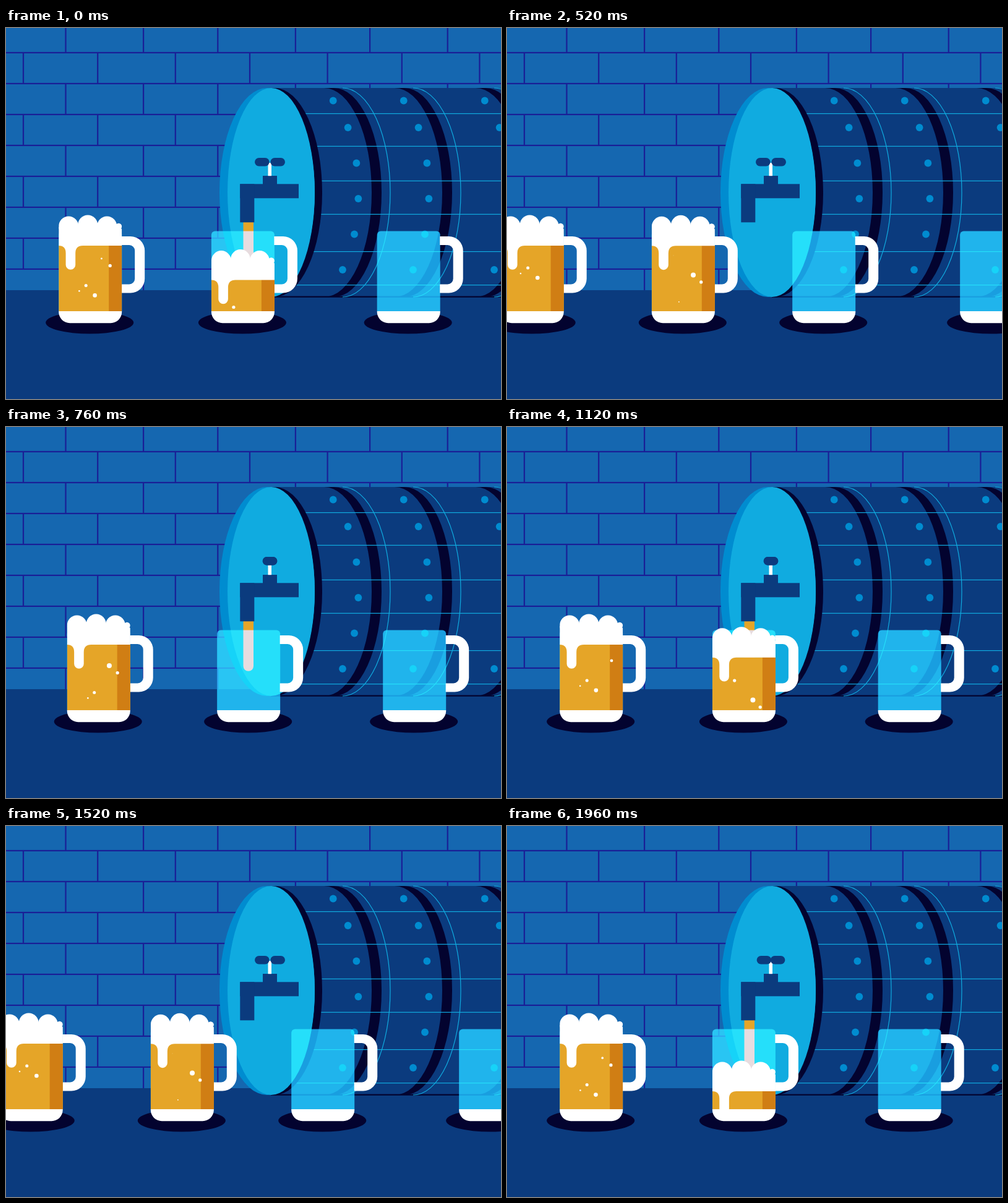
Write an HTML page with a canvas that moves like this. It is 800 px wide and 600 px high and loops after 2 s.

```html
<!DOCTYPE html>
<html lang="en">
<head>
<meta charset="utf-8">
<title>Beer line</title>
<style>
html, body { margin: 0; width: 100%; height: 100%; overflow: hidden; background: #0b3b7e; }
canvas { display: block; width: 800px; height: 600px; }
</style>
</head>
<body>
<canvas id="stage" width="800" height="600"></canvas>
<script>
const ctx = document.getElementById('stage').getContext('2d');
const NAVY = '#0b3b7e', DARK = '#03032f', CYAN = '#10abe0', BLUE = '#008cd0',
      WALL = '#1567b0', GROUT = '#1a1e96', BEER = '#e5a528', AMBER = '#d07e14', WHITE = '#fff';
const CYCLE = 1000;
const STOPS = [874, 599.7, 331.9, 85.2, -155];
const BARREL = { y: 266, rx: 77, ry: 169 };
// x, time of birth, radius
const BUBBLES = [[36, -899, 2.6], [65, -321, 4], [76.5, -110, 2.6], [44, 477, 2.5], [56, 770, 3.3], [35, 640, 1.3]];

const clamp = (v, lo, hi) => Math.max(lo, Math.min(hi, v));

function rect(x, y, w, h, color) {
  ctx.fillStyle = color;
  ctx.fillRect(x, y, w, h);
}

function round(x, y, w, h, r, color) {
  ctx.fillStyle = color;
  ctx.beginPath();
  ctx.roundRect(x, y, w, h, r);
  ctx.fill();
}

function oval(x, y, rx, ry, color) {
  ctx.fillStyle = color;
  ctx.beginPath();
  ctx.ellipse(x, y, rx, ry, 0, 0, 7);
  ctx.fill();
}

// Symmetric cubic-bezier(2/3, 0, 1/3, 1)
function ease(x) {
  x = clamp(x, 0, 1);
  let lo = 0, hi = 1, s;
  for (let i = 0; i < 24; i++) {
    s = (lo + hi) / 2;
    const q = 1 - s;
    if (2 * s * q * q + s * s * q + s * s * s < x) lo = s;
    else hi = s;
  }
  return s * s * (3 - 2 * s);
}

function drawWall() {
  rect(0, 0, 800, 424, WALL);
  for (let row = 0; row < 9; row++) {
    const y = 50 * row - 10;
    const odd = row % 2;
    rect(0, y - 1.2, 800, 2.2, GROUT);
    for (let i = 0; i < 7; i++) {
      const shift = i % 2 ? 2.7 : 0;
      const x = 122.9 * i + (odd ? 28 - shift : 96.5 + shift);
      rect(x - 1.1, y, 2.2, 50, GROUT);
    }
  }
  rect(0, 424, 800, 176, NAVY);
}

// Right half of the barrel's outline
function rim(x, back) {
  const top = -Math.PI / 2;
  ctx.ellipse(x, BARREL.y, BARREL.rx, BARREL.ry, 0, back ? -top : top, back ? top : -top, back);
}

function drawHoop(dx) {
  ctx.fillStyle = DARK;
  ctx.beginPath();
  rim(530 + dx, false);
  rim(514 + dx, true);
  ctx.fill();
  ctx.beginPath();
  rim(544 + dx, false);
  ctx.stroke();
}

function drawBarrel() {
  const { y, rx, ry } = BARREL;
  const hoops = [0, 114, 245];
  rect(428, y - ry, 372, 2 * ry, NAVY);
  rect(428, 433.6, 372, 2.2, DARK);
  ctx.strokeStyle = CYAN;
  ctx.lineWidth = 1.2;
  hoops.forEach(drawHoop);
  for (const seam of [138.5, 191.3, 247.3, 301.3, 361.6, 415.7]) rect(440, seam - .6, 360, 1.2, CYAN);
  for (let i = 0; i < 6; i++) {
    const ny = i ? 103.5 + 57.5 * i : 117.5;
    const nx = 491.5 + 78 * Math.sqrt(1 - ((ny - y) / ry) ** 2);
    for (const dx of hoops) oval(nx + dx, ny, 5.9, 5.9, BLUE);
  }
  oval(434, y, rx, ry, DARK);
  oval(422, y, rx, ry, BLUE);
  oval(428.5, y, 70.5, ry, CYAN);
}

function drawTap(c) {
  const fall = c < 240 ? 458 : Math.min(458, 314 + .8 * (c - 660));
  if (fall > 314) round(383.5, 306, 16.5, fall - 306, [0, 0, 8, 8], BEER);

  rect(378.3, 252.3, 94.7, 23, NAVY);
  rect(378.3, 252.3, 23, 62, NAVY);
  rect(415, 239, 23, 15, NAVY);
  rect(423.5, 218, 5.5, 21.2, WHITE);

  // The two wings of the handle fold together and open again
  const turn = (c + 360) % CYCLE;
  const v = turn < 720 ? turn % 360 : 0;
  const spread = 12.7 * Math.cos(Math.min(v, 360 - v, 120) * Math.PI / 240);
  for (const side of [-1, 1]) round(414.7 + side * spread, 210, 23.6, 13.6, 6.8, NAVY);
}

function drawFoam() {
  for (let i = 0; i < 3; i++) oval(16 + 31 * i, 321 - 2 * (i % 2), 16, 16.5, WHITE);
  oval(96.8, 321, 5.2, 5.2, WHITE);
  ctx.beginPath();
  ctx.moveTo(0, 322);
  ctx.lineTo(94, 320);
  ctx.lineTo(102, 325);
  ctx.lineTo(102, 352);
  ctx.lineTo(39, 352);
  ctx.quadraticCurveTo(27, 352, 27, 364);
  ctx.lineTo(27, 383);
  ctx.arc(19.2, 383, 7.8, 0, Math.PI);
  ctx.lineTo(11.4, 364);
  ctx.quadraticCurveTo(11.4, 352, 0, 352);
  ctx.fill();
}

// Bubbles swell near the base, rise and shrink under the foam
function drawBubbles(age) {
  for (const [x, birth, size] of BUBBLES) {
    const y = 445 - .0545 * (age - birth);
    const r = Math.min(size, (age - birth) / 50, (y - 366) / 5);
    if (r > 0) oval(x + .0002 * (x - 44) * age, y, r, r, WHITE);
  }
}

function drawBeer(age) {
  const drop = Math.max(0, 56.5 * Math.exp(-.0081 * age) - .5);
  if (drop > 160) return;
  ctx.save();
  ctx.beginPath();
  ctx.rect(0, 290, 102.3, 168);
  ctx.clip();
  ctx.translate(0, drop);
  rect(0, 351.5, 102, 107, BEER);
  rect(81, 351.5, 21, 107, AMBER);
  drawFoam();
  drawBubbles(age);
  ctx.restore();
}

function drawMug(x, age) {
  ctx.save();
  ctx.translate(x, 0);
  oval(50, 476.5, 71, 18, DARK);

  ctx.fillStyle = WHITE;
  ctx.beginPath();
  ctx.roundRect(101.5, 337, 37.5, 91.5, [0, 23, 23, 0]);
  ctx.roundRect(101.5, 351, 21.5, 63.5, [0, 9, 9, 0]);
  ctx.fill('evenodd');

  ctx.globalCompositeOperation = 'screen';
  round(0, 328.5, 102, 129.5, [6, 6, 0, 0], 'rgb(22,157,217)');
  ctx.globalCompositeOperation = 'source-over';

  drawBeer(age);
  round(0, 458, 102, 19.2, [0, 0, 18, 18], WHITE);
  ctx.restore();
}

function draw(now) {
  const c = now % CYCLE;
  drawWall();
  drawBarrel();
  drawTap(c);
  for (let i = 0; i < 4; i++) {
    // Full mugs set off a little later than empty ones
    const p = ease((c - (i < 2 ? 124 : 156)) / 785);
    drawMug(STOPS[i] + (STOPS[i + 1] - STOPS[i]) * p, c + (i - 2) * CYCLE);
  }
}

const start = performance.now();
function tick() {
  draw(performance.now() - start);
  requestAnimationFrame(tick);
}
tick();
</script>
</body>
</html>
```
